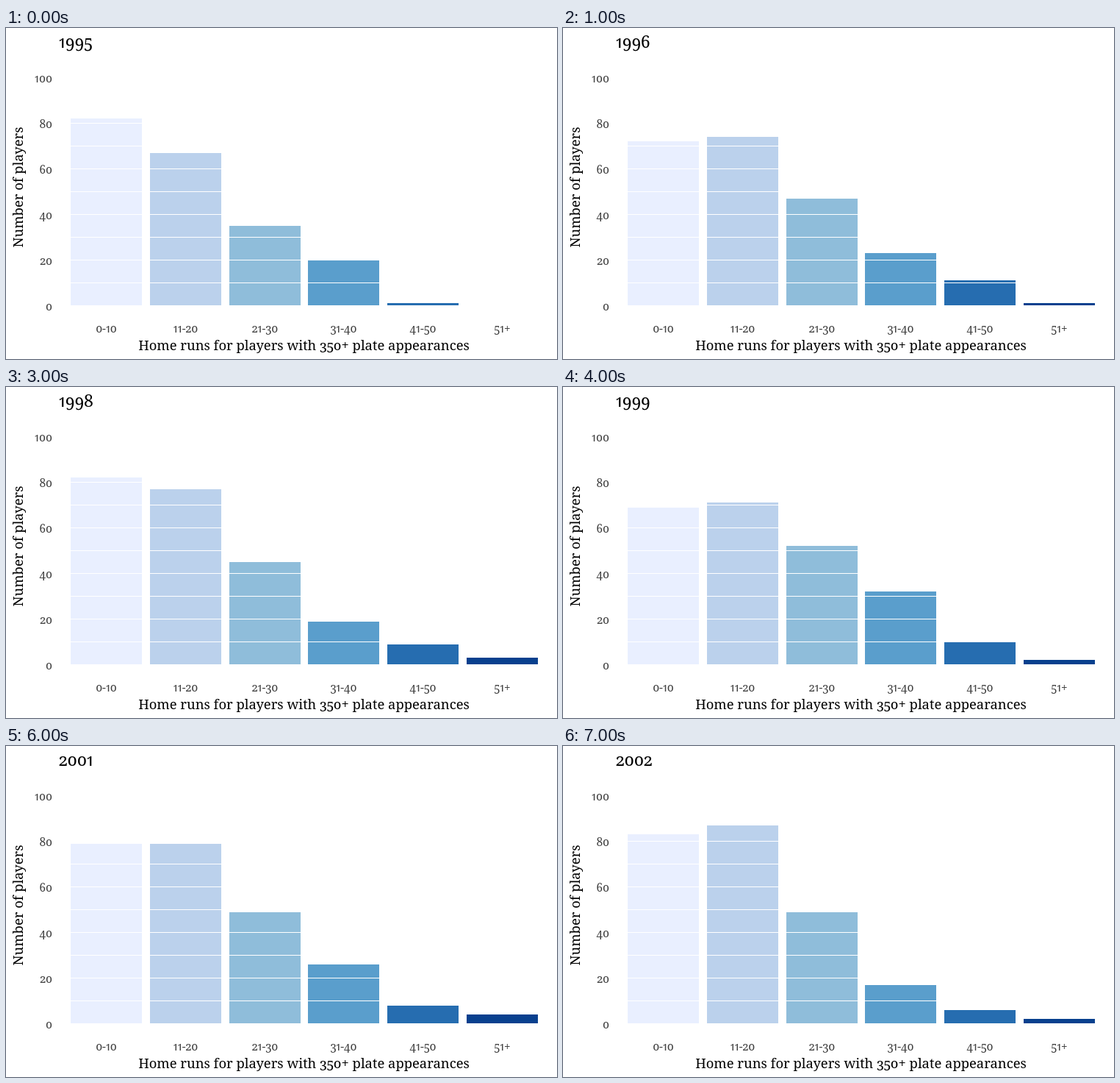
Animation, 750 px wide and 450 px high, one loop 8 s. Source, as an HTML page:

```html
<!DOCTYPE html>
<html lang="en">
<head>
<meta charset="utf-8">
<title>Home runs per season</title>
<style>
  html, body { margin: 0; width: 750px; height: 450px; overflow: hidden; background: #fff; }
  svg { display: block; }
  text { font-family: Georgia, "Noto Serif", serif; font-variant-numeric: oldstyle-nums proportional-nums; }
  .tick { font-size: 15.5px; fill: #404040; }
  .name { font-size: 18.4px; text-anchor: middle; }
  .mid { text-anchor: middle; }
  .end { text-anchor: end; }
</style>
</head>
<body>
<svg id="chart" width="750" height="450" viewBox="0 0 750 450">
  <text id="year" x="72" y="27" font-size="23"></text>
  <text class="name" x="405.5" y="438">Home runs for players with 350+ plate appearances</text>
  <text class="name" transform="translate(23 216.5) rotate(-90)">Number of players</text>
</svg>
<script>
const FIRST_YEAR = 1995, STEP = 1000, BASE = 377, UNIT = 3.1;
const groups = ['0-10', '11-20', '21-30', '31-40', '41-50', '51+'];
const colors = ['#e9efff', '#bbd1ec', '#8fbdda', '#5a9ecc', '#266db0', '#08408e'];
const seasons = [
  [82, 67, 35, 20, 1, 0],
  [72, 74, 47, 23, 11, 1],
  [82, 78, 45, 18, 5, 2],
  [82, 77, 45, 19, 9, 3],
  [69, 71, 52, 32, 10, 2],
  [70, 85, 49, 26, 15, 0],
  [79, 79, 49, 26, 8, 4],
  [83, 87, 49, 17, 6, 2]
];
const chart = document.getElementById('chart');
const year = document.getElementById('year');

function add(tag, attrs, text = '') {
  const node = document.createElementNS('http://www.w3.org/2000/svg', tag);
  for (const key in attrs) node.setAttribute(key, attrs[key]);
  node.textContent = text;
  return chart.appendChild(node);
}

const bars = groups.map((label, i) => {
  const x = Math.round(88 + 107.8 * i);
  add('text', { class: 'tick mid', x: x + 48.5, y: 414 }, label);
  return add('rect', { x, width: 97, fill: colors[i] });
});

// Grid lines show only where they cross the bars.
for (let v = 0; v <= 100; v += 10) {
  const y = BASE - v * UNIT;
  add('rect', { x: 72, y, width: 668, height: 1, fill: '#fff' });
  if (v % 20 === 0) add('text', { class: 'tick end', x: 63, y: y + 7 }, v);
}

let shown = -1;
function draw(now) {
  const index = Math.floor(now / STEP) % seasons.length;
  if (index !== shown) {
    shown = index;
    year.textContent = FIRST_YEAR + index;
    seasons[index].forEach((count, i) => {
      const top = count ? Math.round(BASE + 0.5 - count * UNIT) : BASE;
      bars[i].setAttribute('y', top);
      bars[i].setAttribute('height', BASE - top);
    });
  }
  requestAnimationFrame(draw);
}
draw(performance.now());
</script>
</body>
</html>
```
